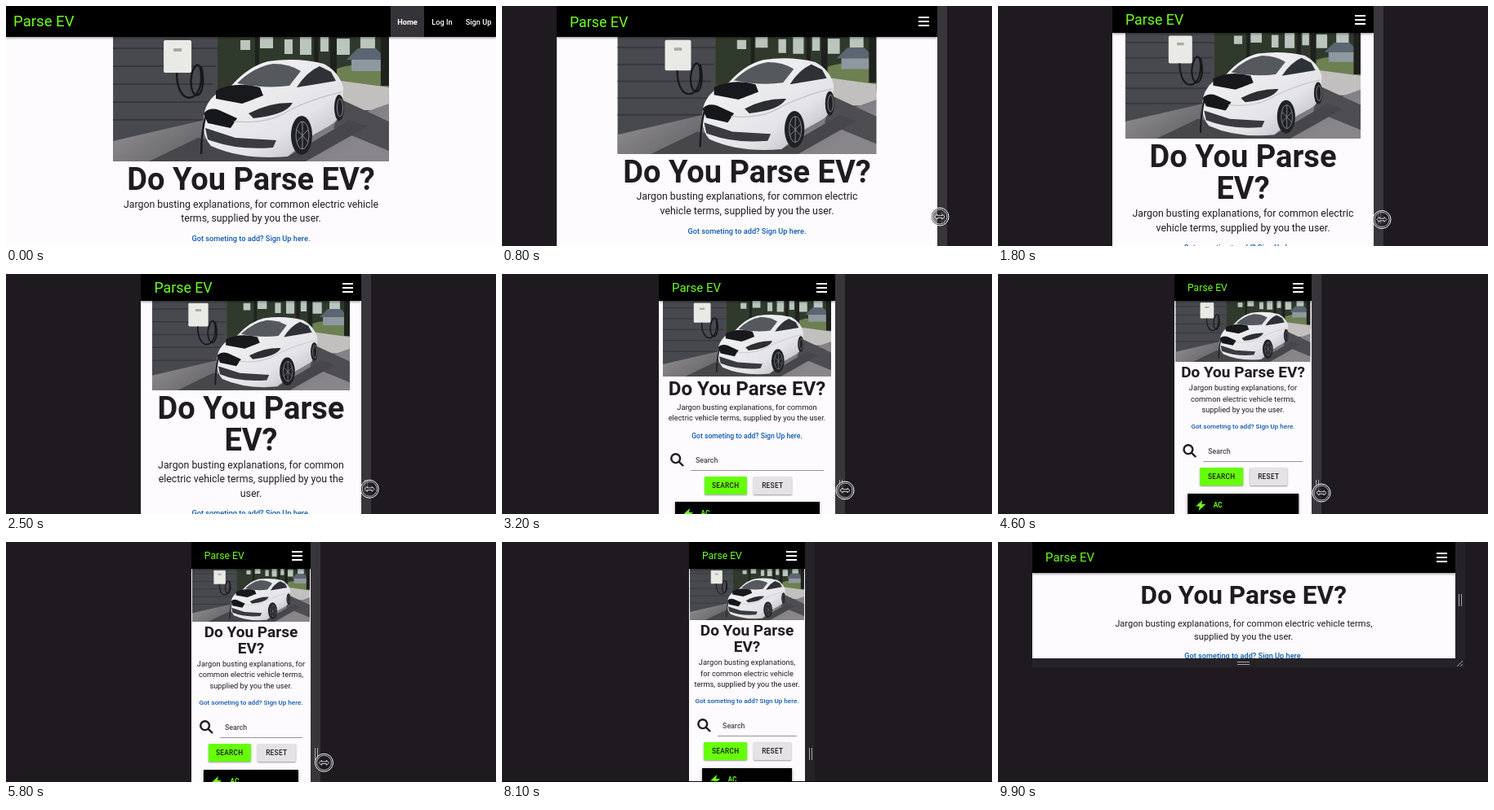
Write an HTML page that moves like this. It is 600 px wide and 295 px high and loops after 10 s.

```html
<!DOCTYPE html>
<html lang="en">
<head>
<meta charset="utf-8">
<title>Responsive page preview</title>
<style>
  html, body { margin: 0; width: 100%; height: 100%; overflow: hidden; background: #1e1a20; }
  body { position: relative; font-family: Roboto, Inter, sans-serif; color: #1f1b20; }
  div, nav, svg { position: absolute; box-sizing: border-box; }
  svg { display: block; overflow: visible; }
  #pane { top: 0; overflow: hidden; background: #fdfbfe; }
  #nav { top: 0; left: 0; width: 100%; background: #000; box-shadow: 0 1px 3px #0007; z-index: 1; }
  #nav * { top: 0; height: 100%; display: flex; align-items: center; white-space: nowrap; }
  #logo { color: #6dff1e; }
  #links { right: 0; width: 129px; color: #fff; font-size: 9.2px; font-weight: 500; }
  #links div { justify-content: center; }
  #burger { right: 10px; width: 13px; }
  #burger::before { content: ""; width: 13px; height: 12px;
    background: linear-gradient(#fff 2px, #0000 2px 5px, #fff 5px 7px, #0000 7px 10px, #fff 10px); }
  #main { left: 50%; transform: translateX(-50%); text-align: center; }
  #main > * { position: relative; margin: 0; }
  #photo { width: 100%; height: auto; overflow: hidden; }
  h1 { line-height: 1.03; font-weight: 700; }
  #intro { padding: 0 .45em; }
  #more { height: 14px; line-height: 14px; white-space: nowrap; color: #0d5ab0;
    display: flex; justify-content: center; }
  #more, .label { font-weight: 500; }
  #find { height: 0; font-size: 8.3px; }
  .field { left: 34px; right: 9px; top: 15px; height: 21px; padding: 3px 6px; text-align: left;
    font-size: 8.8px; color: #4a464c; border-bottom: 1px solid #98959a; }
  .button { top: 43px; height: 22px; line-height: 22px; border-radius: 1px; font-weight: 500;
    letter-spacing: .3px; box-shadow: 0 1px 2px #0006; }
  .card { left: 14.5px; right: 14.5px; top: 74.5px; height: 90px; background: #000; color: #6dff1e;
    font-weight: 700; box-shadow: 0 1px 4px #0005; }
  .card div { left: 32px; top: 9px; line-height: 11px; }
  .grip { border: solid #aaa8ac; }
  #side .grip { left: 4.5px; top: 50%; margin-top: -7.5px; width: 4px; height: 15px; border-width: 0 1px; }
  #foot { left: 42px; top: 143px; width: 529px; height: 11px; background: #252328; }
  #foot .grip { left: 251px; top: 4px; width: 15px; height: 4px; border-width: 1px 0; }
  #edge { left: 0; top: 294px; width: 100%; height: 1px; background: #09080a; }
</style>
</head>
<body>
<div id="pane">
  <nav id="nav">
    <div id="logo">Parse EV</div>
    <div id="links">
      <div style="left:0;width:41px;background:#363338;font-weight:700">Home</div>
      <div style="left:43px;width:40px">Log In</div>
      <div style="left:84px;width:47px">Sign Up</div>
    </div>
    <div id="burger"></div>
  </nav>
  <div id="main">
    <svg id="photo" viewBox="0 0 338 153">
      <defs>
        <linearGradient id="floor" x2="1" y2=".3"><stop stop-color="#9a989a"/><stop offset=".5" stop-color="#67666a"/><stop offset="1" stop-color="#88868a"/></linearGradient>
        <linearGradient id="paint" x2="1" y2="1"><stop stop-color="#f7f7f9"/><stop offset=".65" stop-color="#e4e4e8"/><stop offset="1" stop-color="#aaaab2"/></linearGradient>
      </defs>
      <rect width="338" height="153" fill="#48494e"/>
      <path d="M0 14H128M0 36H126M0 58H122M0 80H118M0 102H112" stroke="#37383d" stroke-width="2"/>
      <path d="M128 0H338V70H128Z" fill="#2f3a2c"/>
      <path d="M156 4h12v12h-12zM180 0h16v14h-16zM210 3h10v18h-10zM229 0h14v22h-14zM254 0h10v18h-10zM274 2h16v20h-16zM303 0h18v14h-18z" fill="#b9c5bd"/>
      <path d="M272 40Q300 28 338 44V72H272Z" fill="#6d8051"/>
      <path d="M286 28L300 14H322L336 28Z" fill="#5b6672"/><path d="M292 28H332V42H292Z" fill="#8d98a0"/>
      <path d="M174 0h5v40h-5zM246 0h6v40h-6zM266 0h8v48h-8zM328 0h10v60h-10z" fill="#1f211f"/>
      <path d="M272 53L338 62V90H272Z" fill="#c2c0bf"/>
      <path d="M0 128L112 102H282L338 82V153H0Z" fill="url(#floor)"/>
      <path d="M282 78L338 104V140L270 112Z" fill="#4e4d52"/>
      <path d="M44 153L104 124L214 147L290 102L312 110L236 153Z" fill="#47464b"/>
      <rect x="62" y="4" width="34" height="40" rx="2" fill="#e9e9e6"/>
      <rect x="74" y="14" width="10" height="4" fill="#a9aaa8"/>
      <path d="M78 44C78 86 108 82 108 50S92 42 96 62S116 70 108 36" fill="none" stroke="#18181b" stroke-width="2.4"/>
      <path d="M112 92Q118 70 145 60Q166 36 190 30Q226 25 258 33Q276 42 282 62L281 90Q276 104 264 110L246 120L214 147Q160 152 120 134Q107 120 112 92Z" fill="url(#paint)"/>
      <path d="M152 57Q172 37 196 33Q216 33 230 42L216 60Q186 64 152 57Z" fill="#55595d"/>
      <path d="M225 62Q237 43 253 36L267 43L273 54Q250 58 225 62Z" fill="#2e3135"/>
      <path d="M126 66Q150 54 180 62L184 72Q164 80 158 82L126 76Z" fill="#18191c"/>
      <path d="M111 94Q118 86 130 90L152 100L144 112L116 106Z" fill="#16171a"/>
      <path d="M166 94Q192 80 220 81Q212 96 172 100Z" fill="#2c2e32"/>
      <path d="M113 112L150 124L200 127L196 136Q150 140 116 126Z" fill="#3a3b40"/>
      <path d="M114 94Q108 118 108 144" fill="none" stroke="#1b1b1e" stroke-width="2.5"/>
      <path d="M148 104Q190 108 216 90Q250 74 280 68" fill="none" stroke="#c0c0c6" stroke-width="1.2"/>
      <g fill="#202124" stroke="#8c8c92" stroke-width="1">
        <ellipse cx="231" cy="121" rx="13" ry="24" stroke="none"/><ellipse cx="232" cy="121" rx="8" ry="17"/>
        <ellipse cx="277" cy="87" rx="6" ry="16" stroke="none"/><ellipse cx="278" cy="87" rx="3.5" ry="11"/>
        <path d="M232 104V138M225 114L239 129M225 129L239 114"/>
      </g>
    </svg>
    <h1 id="title">Do You Parse EV?</h1>
    <p id="intro">Jargon busting explanations, for common electric vehicle terms, supplied by you the user.</p>
    <p id="more">Got someting to add? Sign Up here.</p>
    <div id="find">
      <svg style="left:9px;top:14px" width="17" height="17" fill="none" stroke="#1f1b20" stroke-width="2.4"><circle cx="6.7" cy="6.7" r="5.4"/><path d="M10.6 10.6L16 16"/></svg>
      <div class="field label">Search</div>
      <div class="button" style="left:calc(50% - 52.5px);width:52.5px;background:#66ff0a">SEARCH</div>
      <div class="button" style="left:calc(50% + 8px);width:46.5px;background:#e4e2e5">RESET</div>
      <div class="card">
        <svg style="left:10px;top:8px" width="12" height="13"><path d="M8 0L0 7.5H4.5L3.5 13L12 5H7Z" fill="#6dff1e"/></svg>
        <div>AC</div>
      </div>
    </div>
  </div>
</div>
<div id="side" style="top:0;width:12px"><div class="grip"></div></div>
<div id="foot">
  <div class="grip"></div>
  <svg style="left:520px;top:3px" width="8" height="7" stroke="#aaa8ac"><path d="M0 7L7 0M4 7L7 4"/></svg>
</div>
<div id="edge"></div>
<svg id="cursor" width="1" height="1" style="left:0;top:0" fill="none" stroke="#fff">
  <circle r="11" fill="#1e1a20" fill-opacity=".55"/><circle r="9" stroke-width=".7"/>
  <path d="M-6 0L-3 -3V-1.3H3V-3L6 0L3 3V1.3H-3V3Z" fill="#1e1a20" stroke-width=".8"/>
</svg>
<script>
const LOOP = 10000, ROTATE = 8200;
const el = id => document.getElementById(id);
const show = (id, on) => el(id).style.display = on ? "" : "none";
const px = (id, prop, value) => el(id).style[prop] = value + "px";

// time, left edge of the page, pointer x and y
const path = [
  [0, 0, 614, 256], [800, 67, 536, 259], [1100, 96, 513, 260], [1800, 140, 470, 262.5],
  [2200, 154, 456, 263.5], [3200, 192, 420, 266], [4400, 214, 398, 268.5], [4600, 216, 396, 269],
  [5500, 226, 390, 271], [6600, 229, 388, 272], [7400, 229, 483, 283], [LOOP, 229, 483, 283]
];

function at(t) {
  const i = path.findIndex(p => p[0] > t), a = path[i - 1], b = path[i];
  const k = (t - a[0]) / (b[0] - a[0]);
  return a.map((v, j) => v + (b[j] - v) * k);
}

// font sizes: logo, title, intro, link; then line height and photo share of the width
function style(w, wide) {
  if (wide) return [15, 31.6, 11.1, 9.2, 16, .68];
  if (w > 584) return [18.6, 38, 12.3, 9.2, 17.6, .563];
  if (w > 353) return [17.8, 38, 12.3, 9.2, 17.6, .681];
  if (w > 250) return [17.8, 38, 12.3, 9.2, 17.6, .9];
  if (w > 200) return [15, 24.1, 9.25, 8.6, 13.4, .954];
  return [12.2, 19, 9.25, 8.05, 13.4, .985];
}

function draw(t) {
  const wide = t >= ROTATE;
  let [, left, x, y] = at(t);
  if (wide) left = 42;
  const w = wide ? 517.5 : 600 - 2 * left, h = wide ? 143 : 520;
  const bar = w > 353 ? 38 : 33, desktop = w > 584;
  const [logo, title, intro, more, line, share] = style(w, wide);

  px("pane", "left", left); px("pane", "width", w); px("pane", "height", h);
  px("side", "left", left + w); px("side", "height", h);
  el("side").style.background = t < 6700 ? "#38363a" : "#252328";
  px("nav", "height", bar);
  px("logo", "left", desktop ? 9 : 16); px("logo", "fontSize", logo);
  show("links", desktop); show("burger", !desktop);

  px("main", "top", bar); px("main", "width", w * share);
  show("photo", !wide);
  px("title", "fontSize", title); px("title", "paddingTop", wide ? 11.7 : 3);
  px("intro", "fontSize", intro); px("intro", "lineHeight", line); px("intro", "paddingTop", wide ? 10.7 : 2.7);
  px("more", "fontSize", more); px("more", "marginTop", 8);

  show("foot", wide); show("edge", t >= 6700);
  show("cursor", t < 7400);
  el("cursor").style.transform = `translate(${x}px, ${y}px)`;
}

const start = performance.now();
function tick() {
  const t = (performance.now() - start) % LOOP;
  draw(Math.floor(t / 100) * 100);
  requestAnimationFrame(tick);
}
tick();
</script>
</body>
</html>
```
